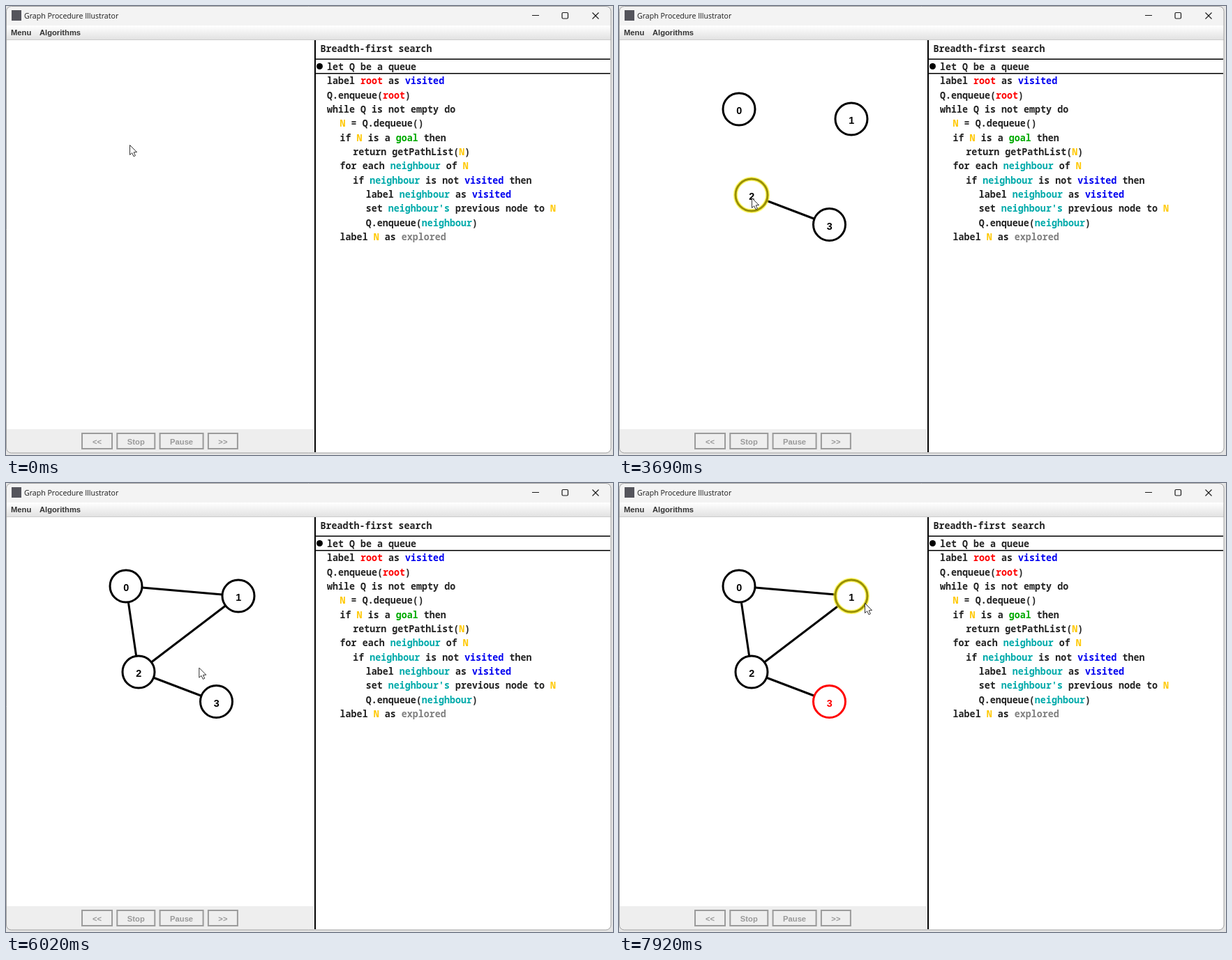
Write an HTML page with a canvas that moves like this. It is 870x644 px and loops after 7990 ms.

```html
<!DOCTYPE html>
<html lang="en">
<head>
<meta charset="utf-8">
<title>Graph Procedure Illustrator</title>
<style>
  html, body { margin: 0; width: 100%; height: 100%; overflow: hidden; background: #e4e4e4; }
  canvas { display: block; }
</style>
</head>
<body>
<canvas id="stage" width="870" height="644"></canvas>
<script>
const ctx = document.getElementById('stage').getContext('2d');
const LOOP = 7990;
const SANS = '"Liberation Sans", Arial, sans-serif';
const TITLE = '10.6px "Open Sans", "Noto Sans", sans-serif';
const BOLD = 'bold 11.2px ' + SANS;
const MONO = 'bold 13.35px "Noto Sans Mono", monospace';
const NODE_R = 23;
const CLICK = 100;      // how long a left click stays down
const DRAG_TIME = 400;  // pointer travel during a right-button drag
const DRAG_AIM = 4;     // drags run slightly below the node centres
const YELLOW = 'rgba(255, 255, 0, 0.47)';
const RED = 'rgba(255, 0, 0, 0.47)';

const pseudocode = `let Q be a queue
label root as visited
Q.enqueue(root)
while Q is not empty do
  N = Q.dequeue()
  if N is a goal then
    return getPathList(N)
  for each neighbour of N
    if neighbour is not visited then
      label neighbour as visited
      set neighbour's previous node to N
      Q.enqueue(neighbour)
  label N as explored`.split('\n');
const keywordColours = {
  root: '#ff0000', visited: '#0000f0', N: '#ffc800', goal: '#00aa00',
  neighbour: '#00aaaa', "neighbour's": '#00aaaa', explored: '#808080'
};
const keywords = /(\b(?:root|visited|N|goal|neighbour's|neighbour|explored)\b)/;

const node = (x, y) => ({ x, y });
const nodes = [node(172, 148), node(333, 162), node(190, 271), node(301.5, 313.5)];
const dialog = { clicked: 6290, open: 6560, close: 7370, fade: 130 };

// The user's actions, in order
const start = { x: 177, y: 199 };
const moves = [], presses = [], drags = [];

function move(leave, arrive, x, y) {
  moves.push({ leave, arrive, x, y });
}

function press(down, up, colour) {
  presses.push({ down, up, colour });
}

function placeNode(target, leave, arrive, down) {
  move(leave, arrive, target.x, target.y);
  press(down, down + CLICK, YELLOW);
  target.born = down + CLICK;
}

function connect(from, to, down, up) {
  move(down, down + DRAG_TIME, to.x, to.y + DRAG_AIM);
  press(down, up, RED);
  drags.push({ from, to, down, up });
}

const [n0, n1, n2, n3] = nodes;
placeNode(n0, 50, 670, 870);
placeNode(n1, 960, 1220, 1690);
placeNode(n2, 1830, 2250, 2390);
placeNode(n3, 2470, 2870, 2870);
connect(n3, n2, 3210, 3610);
connect(n2, n0, 3750, 4300);
connect(n0, n1, 4375, 5000);
connect(n1, n2, 5130, 5680);
move(5970, 6020, 276, 264);
move(6020, 6180, n3.x, n3.y);
press(dialog.clicked - 70, dialog.clicked, YELLOW);
move(6300, 6420, 351, 326);
move(6700, 6960, 360, 331);
move(6960, 7100, 383, 349);
press(7160, 7160 + CLICK, YELLOW);
move(7400, 7920, 352, 172);

const clamp01 = v => Math.max(0, Math.min(1, v));
const easeOut = k => 1 - (1 - k) ** 2;

function pointerAt(t) {
  let { x, y } = start;
  for (const m of moves) {
    const k = easeOut(clamp01((t - m.leave) / (m.arrive - m.leave)));
    x += (m.x - x) * k;
    y += (m.y - y) * k;
  }
  return [x, y];
}

function text(str, x, y, font, colour, align = 'left') {
  ctx.font = font;
  ctx.fillStyle = colour;
  ctx.textAlign = align;
  ctx.fillText(str, x, y);
}

function box(x, y, w, h, fill) {
  ctx.fillStyle = fill;
  ctx.fillRect(x, y, w, h);
}

function stroke(colour, width) {
  ctx.strokeStyle = colour;
  ctx.lineWidth = width;
  ctx.stroke();
}

function frame(x, y, w, h, colour, width) {
  ctx.beginPath();
  ctx.rect(x, y, w, h);
  stroke(colour, width);
}

function line(x1, y1, x2, y2, colour = '#000', width = 3) {
  ctx.beginPath();
  ctx.moveTo(x1, y1);
  ctx.lineTo(x2, y2);
  stroke(colour, width);
}

function circle(x, y, r) {
  ctx.beginPath();
  ctx.arc(x, y, r, 0, Math.PI * 2);
}

function disc(x, y, r, fill) {
  circle(x, y, r);
  ctx.fillStyle = fill;
  ctx.fill();
}

function roundBox(x, y, w, h, r) {
  ctx.beginPath();
  ctx.roundRect(x, y, w, h, r);
}

function cross(x, y, size, colour) {
  line(x, y, x + size, y + size, colour, 1.1);
  line(x + size, y, x, y + size, colour, 1.1);
}

function gradient(top, bottom, ...colours) {
  const g = ctx.createLinearGradient(0, top, 0, bottom);
  colours.forEach((c, i) => g.addColorStop(i / (colours.length - 1), c));
  return g;
}

function drawWindow(active) {
  const ink = active ? '#1a1a1a' : '#939393';
  box(0, 0, 870, 644, '#e4e4e4');
  roundBox(0.5, 0.5, 866.5, 640.5, 7);
  ctx.save();
  ctx.clip();
  box(0, 0, 868, 28, '#f3f3f3');
  box(0, 28, 868, 20, gradient(28, 48, '#ffffff', '#e2e2e2'));
  box(0, 48, 868, 1, '#cccccc');
  box(0, 49, 868, 593, '#ffffff');
  box(0, 607, 441, 35, '#eeeeee');
  ctx.restore();
  stroke(active ? '#a0a0a0' : '#b4b4b4', 1);

  box(8, 6, 14, 15, '#55555c');
  text('Graph Procedure Illustrator', 26, 18, TITLE, ink);
  line(754, 13.5, 764, 13.5, ink, 1);
  roundBox(797, 9.5, 8.5, 8.5, 1.5);
  stroke(ink, 1.2);
  cross(840.5, 9.5, 9, ink);
  text('Menu', 7, 42, BOLD, '#333');
  text('Algorithms', 48, 42, BOLD, '#333');

  let x = 108;
  for (const [label, w] of Object.entries({ '<<': 45, Stop: 56, Pause: 64, '>>': 44 })) {
    frame(x + 1, 613, w - 2, 22, '#9b9b9b', 2);
    text(label, x + w / 2, 628.5, BOLD, '#999', 'center');
    x += w + 5.3;
  }
}

function drawCode() {
  box(442, 49, 2, 591, '#000');
  box(444, 75.5, 422, 1.5, '#000');
  box(444, 96, 422, 1.5, '#000');
  disc(449.5, 86.5, 4.5, '#000');
  text('Breadth-first search', 450.5, 66, MONO, '#222');
  pseudocode.forEach((row, i) => {
    const words = row.trimStart();
    let x = 460 + (row.length - words.length) * 9.3;
    for (const part of words.split(keywords)) {
      text(part, x, 91.8 + i * 20.35, MONO, keywordColours[part] || '#222');
      x += ctx.measureText(part).width;
    }
  });
}

function litNode(t, [px, py], drag) {
  if (drag) return drag.from;
  if (t >= dialog.clicked && t < dialog.close) return n3;
  return nodes.find(n => t >= n.born && Math.hypot(px - n.x, py - n.y) < 25);
}

function drawGraph(t, pointer, drag) {
  for (const { from, to, up } of drags) {
    if (t >= up) line(from.x, from.y, to.x, to.y);
  }
  const lit = litNode(t, pointer, drag);
  nodes.forEach((n, i) => {
    if (t < n.born) return;
    const colour = n === n3 && t >= dialog.close ? '#f00' : '#000';
    disc(n.x, n.y, NODE_R, '#fff');
    stroke(colour, 3);
    if (n === lit) stroke('rgba(255, 240, 0, 0.6)', 6);
    text(i, n.x + 0.3, n.y + 7, 'bold 14.4px ' + SANS, colour, 'center');
  });
  if (drag) line(drag.from.x, drag.from.y, ...pointer);
}

function drawDialog(t) {
  const progress = from => clamp01((t - from + 50) / dialog.fade);
  const shown = progress(dialog.open) - progress(dialog.close);
  if (shown <= 0) return;
  const scale = 0.9 + 0.1 * shown;
  ctx.save();
  ctx.globalAlpha = shown;
  ctx.translate(432.5, 319.5);
  ctx.scale(scale, scale);
  ctx.translate(-432.5, -319.5);

  roundBox(315, 266, 235, 107, 7);
  ctx.save();
  ctx.shadowColor = 'rgba(0, 0, 0, 0.42)';
  ctx.shadowBlur = 46;
  ctx.shadowOffsetY = 20;
  ctx.fillStyle = '#eeeeee';
  ctx.fill();
  ctx.restore();
  ctx.save();
  ctx.clip();
  box(315, 266, 235, 26, '#f3f3f3');
  ctx.restore();
  stroke('#999', 1);

  text('Set node', 321.5, 283, TITLE, '#1a1a1a');
  cross(530.5, 274.5, 9, '#222');
  box(327, 304, 25, 25, '#bbb');
  box(324.5, 301.5, 24.5, 24.5, '#9cc69c');
  frame(325, 302, 23.5, 23.5, '#587058', 1.2);
  text('?', 337, 320.5, 'bold 19px ' + SANS, '#222', 'center');
  text('Set node 3:', 366, 320.5, BOLD, '#333');

  ['Root', 'Goal', 'Unset'].forEach((label, i) => {
    const x = 362 + i * 48.5;
    const focused = i === 0;
    box(x, 338, 43, 23, gradient(338, 361, '#dde8f3', '#ffffff', '#b8cfe5'));
    frame(x + 0.5, 338.5, 42, 22, '#7a8a99', focused ? 2 : 1.2);
    if (focused) frame(371.5, 344.5, 25.5, 11, '#a3b8cc', 1);
    text(label, x + 22, 354.5, BOLD, '#333', 'center');
  });
  ctx.restore();
}

const arrow = new Path2D('M0 0V14L3.2 11.2L5.5 16.2L7.9 15.2L5.7 10.3L10 10.1Z');

function drawPointer(x, y) {
  ctx.save();
  ctx.translate(x + 0.5, y + 0.5);
  ctx.fillStyle = '#fff';
  ctx.fill(arrow);
  ctx.strokeStyle = '#333';
  ctx.lineWidth = 1;
  ctx.stroke(arrow);
  ctx.restore();
}

function draw(t) {
  const pointer = pointerAt(t);
  const held = ({ down, up }) => t >= down && t < up;
  const drag = drags.find(held);
  const pressed = presses.find(held);
  drawWindow(t < dialog.open || t >= dialog.close);
  drawCode();
  drawGraph(t, pointer, drag);
  drawDialog(t);
  drawPointer(...pointer);
  if (pressed) disc(...pointer, 11, pressed.colour);
}

const began = performance.now();
function tick() {
  draw((performance.now() - began) % LOOP);
  requestAnimationFrame(tick);
}
tick();
</script>
</body>
</html>
```
